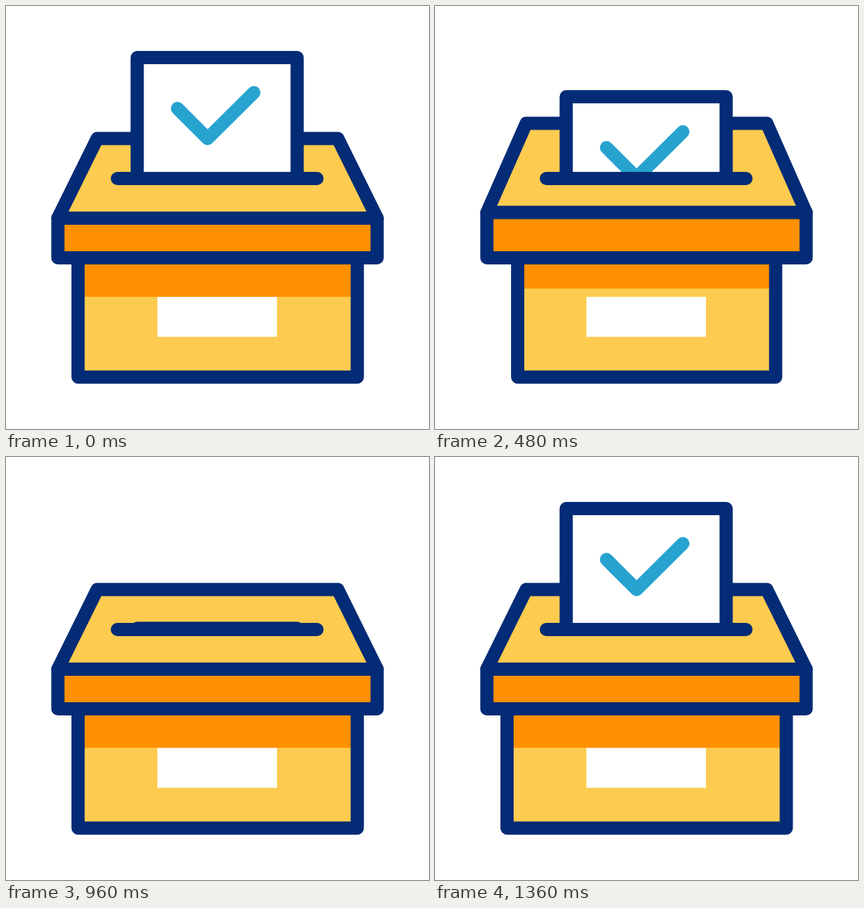
Write an HTML page that moves like this. It is 640 by 640 pixels and loops after 1480 ms.

```html
<!DOCTYPE html>
<html lang="en">
<head>
<meta charset="utf-8">
<title>Ballot box</title>
<style>
  html, body { margin: 0; width: 100%; height: 100%; overflow: hidden; background: #fff; }
  svg { display: block; width: 100%; height: 100%; }
  .line { stroke: #042b76; stroke-width: 20; stroke-linejoin: round; stroke-linecap: round; }
</style>
</head>
<body>
<svg viewBox="0 0 640 640">
  <defs>
    <clipPath id="above"><rect width="640" height="261"/></clipPath>
  </defs>
  <path id="body" fill="#fdcb50"/>
  <path id="shade" fill="#ff9100"/>
  <path id="frame" class="line" fill="none"/>
  <rect x="229" y="440" width="181" height="60.5" fill="#fff"/>
  <path id="lid" class="line" fill="#fdcb50"/>
  <path id="rim" class="line" fill="#ff9100"/>
  <g clip-path="url(#above)">
    <g id="paper">
      <path class="line" fill="#fff" d="M198.5 0H440.5V260H198.5Z"/>
      <path d="M259.5 77L305 122.5L375 53" fill="none" stroke="#27a3cf" stroke-width="20"
            stroke-linecap="round" stroke-linejoin="round"/>
    </g>
  </g>
  <path class="line" d="M168.5 261H470.5"/>
</svg>
<script>
  const LOOP = 1480, STEP = 40;
  const REST = 78, PEAK = 37, HIDDEN = 262;

  // Keys are [time, value] pairs, eased in and out between neighbours.
  const paperKeys = [[195, REST], [410, PEAK], [561, HIDDEN], [947, HIDDEN], [1147, PEAK], [1360, REST]];
  const stretchKeys = [[381, 0], [553, 37.5], [760, 0]];

  const el = id => document.getElementById(id);
  const draw = (id, d) => el(id).setAttribute('d', d);

  function valueAt(keys, t) {
    if (t <= keys[0][0]) return keys[0][1];
    for (let i = 1; i < keys.length; i++) {
      const [t0, a] = keys[i - 1], [t1, b] = keys[i];
      if (t < t1) {
        const p = (t - t0) / (t1 - t0);
        return a + (b - a) * p * p * (3 - 2 * p);
      }
    }
    return keys[keys.length - 1][1];
  }

  function render(t) {
    const stretch = valueAt(stretchKeys, t);
    const top = 200.5 - stretch;
    const edge = 321 - stretch * 0.37;
    const left = 109 + stretch * 0.7;
    const right = 531.5 - stretch * 0.7;
    const shadeEnd = 440 - stretch * 0.54;
    const box = (x0, y0, x1, y1) => `M${x0} ${y0}H${x1}V${y1}H${x0}Z`;

    draw('body', box(left, 381, right, 561.5));
    draw('shade', box(left, 381, right, shadeEnd));
    draw('frame', box(left, 381, right, 561.5));
    draw('lid', `M138 ${top}H502L561.5 ${edge}H78.5Z`);
    draw('rim', box(78.5, edge, 561.5, 381));

    const y = valueAt(paperKeys, t);
    el('paper').setAttribute('transform', `translate(0 ${y})`);
    el('paper').setAttribute('visibility', y < HIDDEN ? 'visible' : 'hidden');
  }

  const start = performance.now();
  function tick() {
    const t = (performance.now() - start) % LOOP;
    render(Math.floor(t / STEP) * STEP);
    requestAnimationFrame(tick);
  }
  tick();
</script>
</body>
</html>
```
